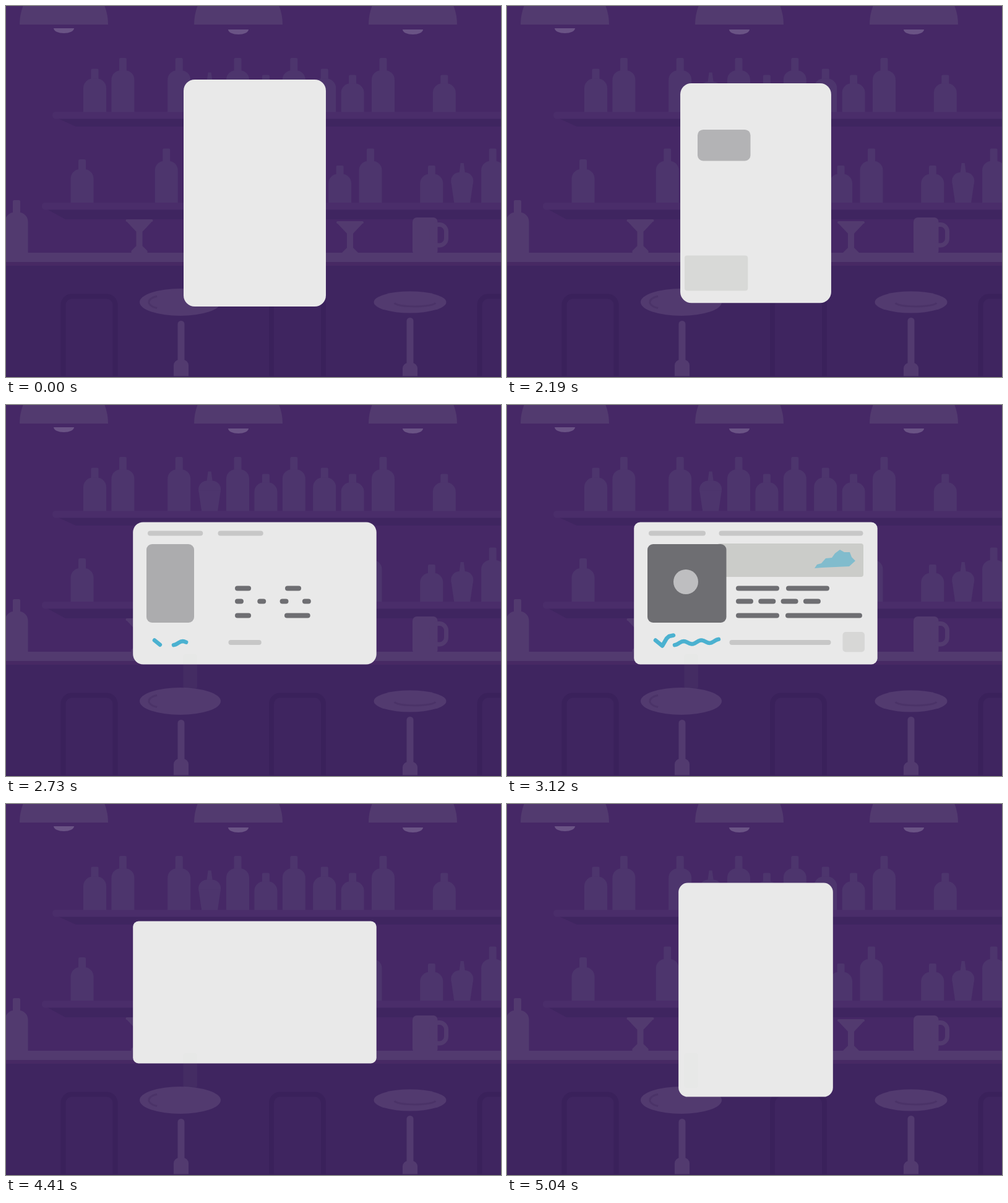
An HTML page with a canvas that plays this animation: 800 px wide and 600 px high, repeating every 5.07 s.

```html
<!DOCTYPE html>
<html lang="en">
<head>
<meta charset="utf-8">
<title>Card turning in a bar</title>
<style>
  html, body { margin: 0; width: 100%; height: 100%; overflow: hidden; background: #462866; }
  canvas { display: block; width: 800px; height: 600px; }
</style>
</head>
<body>
<canvas id="stage" width="800" height="600"></canvas>
<script>
const LOOP = 5070, STEP = 30, PITCH = 45.4;
const WALL = '#462866', DARK = '#3f2560', SHELF = '#4a2d6a', BOTTLE = '#4d356d',
      ITEM = '#523a6f', PANEL = '#3a215b', BULB = '#6a5385';
const PAPER = '#e9e9e9', LIGHT = '#c7c7c7', INK = '#6e6e72', BAND = '#cbccc9', BLUE = '#4bb1d0';

const backdrop = document.createElement('canvas');
backdrop.width = 800;
backdrop.height = 600;
let ctx = backdrop.getContext('2d');

const clamp = v => Math.min(1, Math.max(0, v));
const mix = (a, b, p) => a + (b - a) * p;
const span = (t, start, length) => clamp((t - start) / length);
const sine = p => (1 - Math.cos(Math.PI * p)) / 2;
const quad = p => p < .5 ? 2 * p * p : 1 - 2 * (1 - p) * (1 - p);

// ---- drawing helpers ----

function box(x, y, w, h, r, color) {
  ctx.fillStyle = color;
  ctx.beginPath();
  ctx.roundRect(x, y, w, h, r);
  ctx.fill();
}

function frameBox(x, y, w, h, r, width, color) {
  ctx.strokeStyle = color;
  ctx.lineWidth = width;
  ctx.beginPath();
  ctx.roundRect(x, y, w, h, r);
  ctx.stroke();
}

function oval(x, y, rx, ry, color, from = 0, to = Math.PI * 2) {
  ctx.fillStyle = color;
  ctx.beginPath();
  ctx.ellipse(x, y, rx, ry, 0, from, to);
  ctx.fill();
}

function bow(x, y, rx, ry, from, to) {
  ctx.strokeStyle = '#4b3368';
  ctx.lineWidth = 3;
  ctx.beginPath();
  ctx.ellipse(x, y, rx, ry, 0, from, to);
  ctx.stroke();
}

function shape(points, color) {
  ctx.fillStyle = color;
  ctx.beginPath();
  points.forEach(([x, y]) => ctx.lineTo(x, y));
  ctx.fill();
}

// Fills a profile of [half width, y] pairs, mirrored about x.
function turned(x, profile, color) {
  const right = profile.map(([w, y]) => [x + w, y]);
  const left = profile.map(([w, y]) => [x - w, y]).reverse();
  shape([...right, ...left], color);
}

// Strokes the first share p of a polyline.
function trim(points, p, color, width) {
  if (p <= 0) return;
  const gap = i => Math.hypot(points[i][0] - points[i - 1][0], points[i][1] - points[i - 1][1]);
  let left = 0;
  for (let i = 1; i < points.length; i++) left += gap(i);
  left *= p;
  ctx.strokeStyle = color;
  ctx.lineWidth = width;
  ctx.lineCap = ctx.lineJoin = 'round';
  ctx.beginPath();
  ctx.moveTo(...points[0]);
  for (let i = 1; i < points.length && left > 0; i++) {
    const k = Math.min(1, left / gap(i));
    ctx.lineTo(mix(points[i - 1][0], points[i][0], k), mix(points[i - 1][1], points[i][1], k));
    left -= gap(i);
  }
  ctx.stroke();
}

function faded(alpha, draw) {
  if (alpha <= 0) return;
  ctx.save();
  ctx.globalAlpha = alpha;
  draw();
  ctx.restore();
}

// ---- room ----

function bottle(x, base, height, color = BOTTLE) {
  const top = base - height, neck = height * .23;
  box(x - 6, top, 12, neck + 12, 2, color);
  box(x - 18.5, top + neck, 37, height - neck, [15, 15, 0, 0], color);
}

function vase(x, base, height) {
  const top = base - height;
  turned(x, [[2.5, top], [5, top + 18]], BOTTLE);
  box(x - 18, top + 15, 36, 28, 14, BOTTLE);
  turned(x, [[17.8, top + 31], [13, base]], BOTTLE);
}

// Small, medium or tall bottle, or a vase; a dot nudges, a space skips a place.
function bottles(x, base, row) {
  const heights = { s: 60, m: 70, t: 87.5 };
  for (const kind of row) {
    if (kind === 'v') vase(x, base, 64);
    else if (heights[kind]) bottle(x, base, heights[kind]);
    x += kind === '.' ? 4 : PITCH;
  }
}

function shelf(x, y, depth) {
  shape([[x + 7, y + 10], [800, y + 10], [800, y + depth], [x + 38, y + depth]], DARK);
  box(x, y, 800, 11.5, 5, SHELF);
}

function martini(x, y) {
  box(x - 22, y, 44, 4, 2, ITEM);
  turned(x, [[21, y + 3], [5, y + 20], [5, y + 43], [13, y + 51], [13, 400]], ITEM);
}

function stool(x, rx, ry, pole, foot) {
  oval(x, 479, rx, ry, ITEM);
  box(653 - 5.5 - (x < 400 ? 370 : 0), pole, 11, 100, 5.5, ITEM);
  box(653 - 12 - (x < 400 ? 370 : 0), foot, 24, 40, 9, ITEM);
}

function paintRoom() {
  box(0, 0, 800, 600, 0, WALL);
  for (let i = 0; i < 3; i++) {
    const x = 93.5 + i * 282;
    oval(x, 30, 71.5, 78, ITEM, Math.PI, Math.PI * 2);
    oval(x, i ? 38 : 36, 16.5, 8, BULB, 0, Math.PI);
  }

  shelf(75, 171, 24);
  bottles(143.5, 171.5, 'mt t.vtst.ms.t ..s');
  shelf(58, 318, 27);
  bottles(123, 318, 'm  t     ..s.t ..s.v.t');

  box(0, 414, 800, 186, 0, DARK);
  box(0, 414, 800, 6, 0, '#472964');
  box(0, 399, 800, 15, 0, ITEM);
  bottle(17, 400, 86, ITEM);
  martini(215.5, 345);
  martini(556, 348);
  box(657, 342, 40.5, 58, [7, 7, 4, 4], ITEM);
  frameBox(688, 353.5, 23.5, 33.5, 11, 7, ITEM);

  for (let i = 0; i < 3; i++) frameBox(92.5 + i * 336.5, 469.5, 84, 160, 14, 8, PANEL);
  stool(281.5, 65.5, 22, 509, 572);
  stool(653, 58.5, 17.5, 504, 577);
  bow(250, 479, 19, 10, Math.PI * .6, Math.PI * 1.4);
  bow(661, 479, 34, 7, .2, Math.PI - .2);
  box(0, 598.5, 800, 1.5, 0, PANEL);
}

// ---- card ----

// A run of rounded bars, each grown to share p.
function bars(p, color, x, y, gap, ...lengths) {
  for (const length of lengths) {
    trim([[x + 4.1, y], [x + length - 4.1, y]], p, color, 8.2);
    x += length + gap;
  }
}

function band(g, x, y, w, h) {
  faded(Math.pow(g, .66), () => box(x, y, w * mix(.1, 1, g), h, 4, BAND));
}

function photo(g, x, y, w, h) {
  faded(Math.pow(g, 1.4), () => box(x, y, w, h, 9, INK));
}

function region(x, y, k) {
  const outline = [[0, 30], [4, 24], [11, 22], [18, 14], [28, 13], [33, 6], [41, 0], [48, 4], [57, 4],
    [60, 12], [66, 18], [56, 27], [12, 29]];
  shape(outline.map(([px, py]) => [x + px * k, y + py * k]), BLUE);
}

// A tick followed by a plain ripple.
function ripple(p, x, y, k, from, length, cycles) {
  const hook = [[0, 0], [11, 9], [18, -3], [22, -6.5], [29, -8]];
  trim(hook.map(([px, py]) => [x + px * k, y + py * k]), p, BLUE, 6.5);
  const points = Array.from({ length: 41 }, (_, i) => {
    const u = i / 40;
    return [from + length * u, y + 5 * k - 4 * u * (cycles % 1) * 2 + 2.6 * Math.cos(u * cycles * Math.PI * 2)];
  });
  trim(points, p, BLUE, 6.5);
}

function drawTall(g) {
  band(g.band, 287, 403.5, 230, 57);
  photo(g.photo, 308, 250.5 - 91 * g.photo, 85.5, 91 * g.photo);

  bars(g.lines, LIGHT, 310, 138.5, 9, 75, 106);
  bars(g.lines, LIGHT, 406, 291.5, 0, 94);
  for (const y of [311.5, 333.5]) bars(g.lines, LIGHT, 307, y, 0, 193);
  bars(g.lines, LIGHT, 307, 358.5, 0, 142);
  bars(g.lines, INK, 407.5, 207.5, 0, 83);
  bars(g.lines, INK, 407.5, 227, 6.5, 18, 18, 18);
  bars(g.lines, INK, 407.5, 245, 6, 51, 35);

  faded(g.pop, () => {
    box(467.5, 350.5, 38, 33.5, 3, BAND);
    oval(350, 205, 13, 13, '#fafafa');
    region(440.5, 419, .93);
  });
  ripple(g.wave, 312, 278.5, .97, 342, 43, 2);
}

function drawWide(g) {
  band(g.band, 340, 224, 236, 54);
  photo(g.photo, 227, 225, 127.5 * g.photo, 127);

  bars(g.lead, LIGHT, 229, 207.5, 0, 92);
  bars(g.lines, LIGHT, 342.5, 207.5, 0, 233);
  bars(g.lines, LIGHT, 359.5, 384, 0, 164);
  bars(g.lines, INK, 370, 296.5, 11, 70, 70);
  bars(g.lines, INK, 370, 317.5, 8.3, 28, 28, 28, 28);
  bars(g.lines, INK, 370, 340.5, 10, 70, 124);

  faded(g.pop, () => {
    box(542.5, 367, 35.5, 32.5, 5, BAND);
    oval(289, 286, 20, 20, '#fafafa');
    region(497, 234, 1);
  });
  ripple(g.wave, 240, 380.5, 1, 271, 71, 2.5);
}

// Parts enter in turn after `start`, stretched by `pace`, and leave from `exit`.
function growth(t, start, pace, wave, exit) {
  const enter = (delay, length) => sine(span(t, start + delay * pace, length * pace));
  if (t < exit) return {
    lead: enter(0, 260), photo: enter(60, 300), lines: enter(80, 415),
    band: enter(260, 300), pop: enter(450, 310), wave: sine(span(t, wave, 420))
  };
  const gone = 1 - sine(span(t, exit, 240));
  return {
    lead: gone, lines: gone, pop: gone, wave: gone,
    photo: 1 - span(t, exit + 150, 360), band: 1 - span(t, exit + 60, 405)
  };
}

// Eases in, then keeps a steady speed until the loop closes.
function turnBack(t) {
  const ramp = 180, rate = .00209, d = Math.max(0, t - 4529);
  return 1 - clamp(d < ramp ? rate * d * d / (2 * ramp) : rate * (d - ramp / 2));
}

function drawCard(t) {
  const back = t > 4500;
  const p = back ? turnBack(t) : quad(span(t, 2081, 529));
  const radius = back ? mix(16, 9, p) : mix(18, 16.5, p) - 7.5 * sine(span(t, 2730, 520));
  box(mix(287, 205.2, p), mix(119, 189.5, p), mix(230, 393.5, p), mix(back ? 362 : 367, 230, p), radius, PAPER);
  if (t >= 2340) faded(.04, () => box(286.5, 403.5, 22.5, 55, 3, '#b9c4ae'));
}

function frame(now) {
  const t = Math.floor((now % LOOP) / STEP) * STEP;
  ctx.drawImage(backdrop, 0, 0);
  drawCard(t);
  if (t < 2430) drawTall(growth(t, 240, .67, 560, 1880));
  else drawWide(growth(t, 2500, 1, 2580, 3870));
}

paintRoom();
ctx = document.getElementById('stage').getContext('2d');
const begin = performance.now();
(function tick() {
  frame(performance.now() - begin);
  requestAnimationFrame(tick);
})();
</script>
</body>
</html>
```
